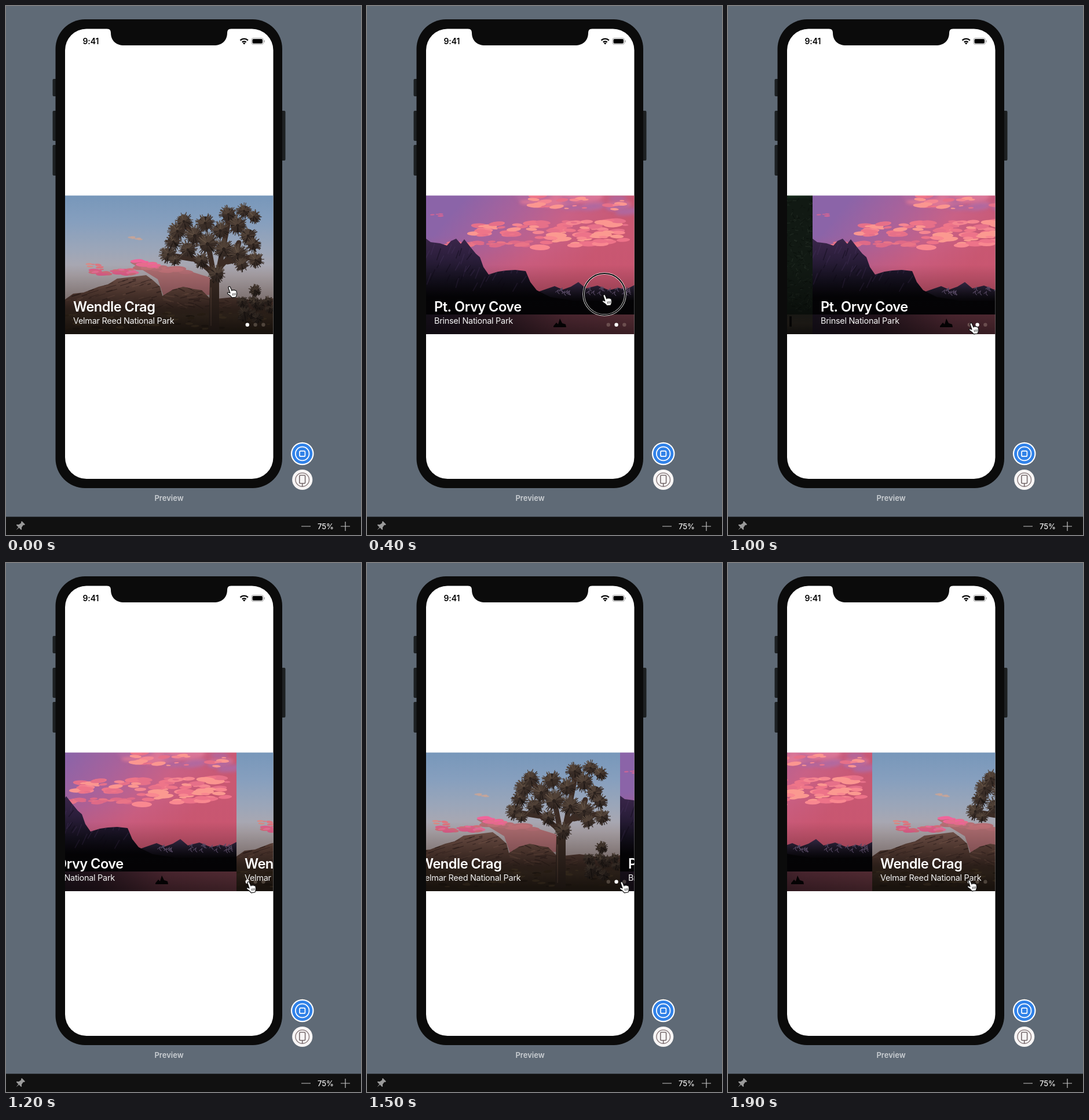
Write an HTML page with a canvas that moves like this. It is 613x914 px and loops after 2 s.

```html
<!DOCTYPE html>
<html lang="en">
<head>
<meta charset="utf-8">
<title>Carousel preview</title>
<style>
html, body { margin: 0; width: 100%; height: 100%; overflow: hidden; background: #5f6a76; }
canvas { display: block; width: 613px; height: 914px; }
</style>
</head>
<body>
<canvas id="stage" width="613" height="914"></canvas>
<script>
const stage = document.getElementById('stage').getContext('2d');
const LOOP = 2000, STEP = 100;
const VIEW = { x: 102, y: 327.5, w: 360, h: 239.5 };
const FONT = 'Inter, "Open Sans", sans-serif';

function seeded(seed) {
  return () => {
    seed = (seed * 1664525 + 1013904223) >>> 0;
    return seed / 4294967296;
  };
}

function gradient(c, x0, y0, x1, y1, colors) {
  const g = c.createLinearGradient(x0, y0, x1, y1);
  colors.forEach((col, i) => g.addColorStop(i / (colors.length - 1), col));
  return g;
}

function box(c, x, y, w, h, r, fill, stroke, line = 1) {
  c.beginPath();
  c.roundRect(x, y, w, h, r);
  paint(c, fill, stroke, line);
}

function disc(c, x, y, r, fill, stroke, line = 1) {
  c.beginPath();
  c.arc(x, y, r, 0, 7);
  paint(c, fill, stroke, line);
}

function paint(c, fill, stroke, line) {
  if (fill) { c.fillStyle = fill; c.fill(); }
  if (stroke) { c.strokeStyle = stroke; c.lineWidth = line; c.stroke(); }
}

function shape(c, d, fill, stroke, line = 1) {
  const p = new Path2D(d);
  if (fill) { c.fillStyle = fill; c.fill(p); }
  if (stroke) { c.strokeStyle = stroke; c.lineWidth = line; c.stroke(p); }
}

function text(c, str, x, y, size, weight, color, spacing = 0, align = 'left') {
  c.font = `${weight} ${size}px ${FONT}`;
  c.letterSpacing = spacing + 'px';
  c.textAlign = align;
  c.fillStyle = color;
  c.fillText(str, x, y);
}

// Scattered flat ellipses inside a slanted strip.
function wisps(c, rnd, n, x, y, w, h, slope, size, colors) {
  for (let i = 0; i < n; i++) {
    const u = rnd(), r = size * (0.4 + rnd());
    c.beginPath();
    c.ellipse(x + u * w, y + slope * u + rnd() * h, r, r * 0.28, -0.12 + rnd() * 0.2, 0, 7);
    c.fillStyle = colors[Math.floor(rnd() * colors.length)];
    c.fill();
  }
}

// Ball of spiky leaves, lit from the upper left.
function tuft(c, rnd, x, y, r) {
  disc(c, x, y, r * 0.72, '#2a211d');
  const tones = ['#1f1815', '#3a2e28', '#514238', '#665546'];
  for (let i = 0; i < r * 6; i++) {
    const a = rnd() * Math.PI * 2, len = r * (0.6 + rnd() * 0.5);
    const lit = 1.4 - Math.cos(a + 0.8) * 0.5 - Math.sin(a) * 1.1;
    c.strokeStyle = tones[Math.max(0, Math.min(3, Math.floor(lit + rnd())))];
    c.lineWidth = 1.2;
    c.beginPath();
    c.moveTo(x + Math.cos(a) * r * 0.2, y + Math.sin(a) * r * 0.2);
    c.lineTo(x + Math.cos(a) * len, y + Math.sin(a) * len);
    c.stroke();
  }
}

function desert(c) {
  const rnd = seeded(7);
  c.fillStyle = gradient(c, 0, 0, 0, 185, ['#7797ba', '#869fbe', '#9ba6b9', '#b0a8ad', '#b3a19f']);
  c.fillRect(0, 0, 360, 240);
  c.globalAlpha = 0.8;
  wisps(c, rnd, 6, 110, 70, 20, 3, 5, 5, ['#c9a597']);
  c.globalAlpha = 1;
  shape(c, 'M112 116 L130 112 L165 122 L205 128 L250 142 L258 172 L170 174 L160 145 Z', '#b06e72');
  wisps(c, rnd, 14, 125, 115, 95, 9, 16, 16, ['#c3747a', '#b87076']);
  wisps(c, rnd, 26, 50, 128, 72, 9, 0, 9, ['#e3618c', '#ee719b', '#d9707f']);
  wisps(c, rnd, 14, 118, 109, 42, 9, 8, 9, ['#f0659b', '#e66d8c']);
  wisps(c, rnd, 7, 36, 117, 28, 6, 2, 6, ['#d98b86', '#e0757f']);

  const rock = gradient(c, 0, 138, 0, 200, ['#77564d', '#604339', '#46312a']);
  const mound = 'M0 180 L14 170 L32 168 L58 158 L74 154 L90 144 L116 141 L140 138 L152 147 L164 158 L168 174 L186 163 L204 158 L222 162 L236 164 L252 180 L290 176 L330 182 L360 178 V240 H0 Z';
  shape(c, mound, rock);
  c.save();
  c.clip(new Path2D(mound));
  for (let i = 0; i < 150; i++) {
    const x = rnd() * 280, y = 140 + rnd() * 56, l = 5 + rnd() * 17;
    c.strokeStyle = rnd() < 0.62 ? 'rgba(45,29,26,.55)' : 'rgba(143,103,88,.35)';
    c.lineWidth = 0.7 + rnd() * 1.4;
    c.beginPath();
    c.moveTo(x, y);
    c.lineTo(x + l, y + (x < 160 ? -l * 0.3 : l * (rnd() - 0.4)));
    c.stroke();
  }
  c.restore();
  c.fillStyle = gradient(c, 0, 186, 0, 232, ['rgba(61,43,32,0)', '#49372a', '#3b2c20']);
  c.fillRect(0, 186, 360, 54);
  wisps(c, rnd, 70, 0, 200, 360, 34, 0, 6, ['#32251b', '#58442f', '#413020']);

  for (let i = 0; i < 12; i++) tuft(c, rnd, 306 + rnd() * 50, 182 + rnd() * 34, 8 + rnd() * 5);
  tuft(c, rnd, 328, 165, 11);
  tuft(c, rnd, 306, 184, 10);

  c.lineCap = 'round';
  shape(c, 'M258 232 V150 C257 125 230 118 218 106 M258 148 C258 120 290 112 300 82 M257 138 L246 80 L205 52 M266 125 L282 45 M280 115 L326 106 M220 110 L183 104', null, '#3b2b24', 9);
  shape(c, 'M248 234 L250 145 L266 143 L266 234 Z', '#3d2d25');
  shape(c, 'M252 160 V225', null, '#594237', 2);
  const leaves = [
    [178, 102, 15], [187, 80, 14], [190, 112, 10], [194, 62, 16], [205, 45, 15], [212, 94, 16],
    [224, 70, 18], [242, 48, 16], [246, 84, 19], [236, 113, 14], [262, 136, 15], [268, 61, 16],
    [282, 33, 15], [274, 93, 18], [298, 52, 17], [309, 27, 13], [326, 37, 12], [316, 70, 16],
    [298, 102, 18], [325, 85, 13], [329, 112, 14], [305, 120, 12]
  ];
  leaves.forEach(([x, y, r]) => tuft(c, rnd, x, y, r));
}

function lake(c) {
  const rnd = seeded(23);
  c.fillStyle = gradient(c, 70, 0, 250, 150, ['#8b64a8', '#a8629b', '#c96186', '#c95872']);
  c.fillRect(0, 0, 360, 240);
  c.fillStyle = gradient(c, 0, 70, 0, 170, ['rgba(195,82,112,0)', 'rgba(205,85,109,.75)']);
  c.fillRect(0, 70, 360, 110);
  c.filter = 'blur(3px)';
  wisps(c, rnd, 24, 170, -3, 190, 24, 8, 22, ['#dd7796', '#d87598', '#b0689f']);
  c.filter = 'none';
  const pinks = ['#ee7589', '#f58691', '#e67089', '#fb9690'];
  wisps(c, rnd, 60, 80, 49, 265, 22, -6, 12, pinks);
  wisps(c, rnd, 34, 190, 72, 165, 22, -14, 13, ['#fb9990', '#f98890', '#ed7389']);
  wisps(c, rnd, 24, 38, 80, 140, 7, 0, 9, ['#df6a87', '#e97487']);
  wisps(c, rnd, 24, 185, 0, 175, 22, 5, 10, pinks);
  wisps(c, rnd, 4, 4, 33, 24, 6, -2, 5, ['#cf6596']);

  const far = 'M180 172 L196 166 L222 157 L236 163 L250 158 L263 150 L276 161 L296 156 L316 164 L332 160 L345 163 L360 155 V240 H180 Z';
  shape(c, far, gradient(c, 0, 152, 0, 180, ['#382b49', '#211a2b', '#0b090f']));
  for (let i = 0; i < 22; i++) {
    const x = 205 + rnd() * 145, y = 162 + rnd() * 10;
    shape(c, `M${x} ${y} l5 -4 l-1 4 l3 3`, null, '#705e80', 1.1);
  }
  const near = 'M0 75 L8 81 L24 83 L36 87 L43 79 L52 75 L60 84 L66 76 L77 90 L86 101 L93 107 L99 124 L108 137 L124 132 L138 130 L154 129 L172 131 L180 150 L191 164 L215 176 L260 183 L360 181 V240 H0 Z';
  shape(c, near, gradient(c, 0, 75, 0, 176, ['#3a264a', '#2b1e3b', '#171222', '#050407']));
  c.save();
  c.clip(new Path2D(near));
  for (let i = 0; i < 45; i++) {
    const x = rnd() * 180, y = 82 + rnd() * 75;
    shape(c, `M${x} ${y} l${-4 - rnd() * 5} ${9 + rnd() * 12}`, null, rnd() < 0.5 ? 'rgba(14,9,23,.45)' : 'rgba(78,57,99,.3)', 1.6);
  }
  c.restore();
  c.fillStyle = '#060508';
  c.fillRect(0, 182, 360, 28);
  c.fillStyle = gradient(c, 0, 0, 360, 0, ['#241a2b', '#3b222f', '#7d4050', '#8e4b58']);
  c.fillRect(0, 206, 360, 34);
  shape(c, 'M220 226 L225 220 L228 223 L231 213 L235 221 L241 223 L242 228 H220 Z', '#090507');
}

function pines(c, rnd, x0, x1, y, h, color) {
  for (let x = x0; x < x1; x += 5) {
    const top = y - h * (0.45 + rnd() * 0.55);
    shape(c, `M${x} ${top} L${x + 5} ${y} H${x - 5} Z`, color);
  }
}

function aurora(c) {
  const rnd = seeded(41);
  c.fillStyle = gradient(c, 0, 0, 0, 200, ['#18261e', '#20382a', '#17291f']);
  c.fillRect(0, 0, 360, 240);
  const glow = (d, color, blur, alpha) => {
    c.filter = `blur(${blur}px)`;
    c.globalAlpha = alpha;
    shape(c, d, color);
  };
  glow('M0 98 L20 92 L75 118 L150 118 L205 150 H0 Z', '#397247', 13, 0.8);
  glow('M60 0 L95 0 L145 130 L115 135 Z', '#397a48', 10, 0.65);
  glow('M5 25 L25 32 L120 130 L88 132 Z', '#47784c', 9, 0.5);
  glow('M178 148 L215 88 L275 30 L360 0 H140 C140 60 170 80 172 148 Z', '#2d8340', 9, 0.85);
  glow('M138 0 H168 C158 40 170 68 186 136 L172 137 C168 90 142 60 138 0 Z', '#4bb158', 4, 0.95);
  glow('M188 0 H264 C255 55 220 60 205 78 C192 98 186 120 184 136 C181 105 188 80 182 45 Z', '#49b957', 5, 0.9);
  glow('M190 0 H233 C244 38 218 66 190 82 C180 55 184 24 190 0 Z', '#72df78', 4, 0.95);
  glow('M199 20 C218 27 224 44 207 62 C192 72 184 49 199 20 Z', '#9cef9d', 4, 0.9);
  glow('M185 138 C205 105 250 95 270 65 L245 120 Z', '#48964f', 8, 0.65);
  c.filter = 'none';
  c.globalAlpha = 1;
  for (let i = 0; i < 45; i++) {
    c.fillStyle = 'rgba(205,225,205,.35)';
    c.fillRect(rnd() * 260, rnd() * 110, 0.9, 0.9);
  }
  pines(c, rnd, 0, 270, 206, 72, '#0b110d');
  c.fillStyle = '#0a0f0c';
  c.fillRect(0, 178, 360, 62);

  c.filter = 'blur(5px)';
  shape(c, 'M268 40 L300 0 H370 V220 H255 L264 150 L276 110 Z', '#111913');
  c.filter = 'none';
  for (let i = 0; i < 520; i++) {
    const y = rnd() * 200, x = 258 + rnd() * 102;
    if (x < 285 - y * 0.12) continue;
    c.strokeStyle = ['#080d09', '#0d140f', '#273129', '#1b251d'][Math.floor(rnd() * 4)];
    c.lineWidth = 0.8;
    c.beginPath();
    c.moveTo(x, y);
    c.lineTo(x + rnd() * 14 - 7, y + rnd() * 10 - 3);
    c.stroke();
  }
  c.fillStyle = gradient(c, 0, 204, 0, 240, ['#292923', '#373129', '#28231e']);
  c.fillRect(0, 206, 360, 34);
  shape(c, 'M0 219 L70 213 L165 210 L135 222 L0 228 Z', '#69432b');
  shape(c, 'M166 166 L186 157 L264 174 V213 H166 Z', '#432a1d');
  for (let y = 170; y < 212; y += 5) shape(c, `M167 ${y} L264 ${y + 3}`, null, '#1e130e', 1);
  shape(c, 'M156 174 L182 153 L283 172 L281 180 L190 163 L158 180 Z', '#1c1613');
  shape(c, 'M184 154 L282 172', null, '#5a4434', 1);
  shape(c, 'M186 142 H194 V157 H186 Z', '#171310');
  box(c, 174, 188, 7, 17, 0, '#c27b55');
  box(c, 228, 190, 11, 15, 0, '#a3653f');
  shape(c, 'M233 190 V205 M228 197 H239', null, '#3a2418', 1.2);
  shape(c, 'M264 202 L269 240 M295 206 V228 M322 209 V227', null, '#0b0a09', 4);
}

function makePage(scene, title, place) {
  const page = document.createElement('canvas');
  page.width = VIEW.w;
  page.height = 240;
  const c = page.getContext('2d');
  scene(c);
  c.fillStyle = gradient(c, 0, 240, 0, 120, ['rgba(0,0,0,.6)', 'rgba(0,0,0,0)']);
  c.fillRect(0, 0, 360, 240);
  text(c, title, 14, 201, 23.6, 600, '#fff', -0.5);
  text(c, place, 14, 222, 14.5, 400, '#f4f4f4', -0.3);
  return page;
}

const pages = [
  makePage(desert, 'Wendle Crag', 'Velmar Reed National Park'),
  makePage(lake, 'Pt. Orvy Cove', 'Brinsel National Park'),
  makePage(aurora, 'Tolwick Hollow', 'Tolwick Hollow National Preserve')
];

const moves = [
  { at: 20, dur: 280, from: 0, to: 1, swipe: true },
  { at: 400, dur: 200, from: 1, to: 2, swipe: true },
  { at: 781, dur: 280, from: 2, to: 1 },
  { at: 1125, dur: 280, from: 1, to: 0 },
  { at: 1455, dur: 280, from: 0, to: 1 },
  { at: 1743, dur: 280, from: 1, to: 0 }
];

// Time and fingertip position.
const pointer = [
  [0, 386, 485], [100, 314, 488], [200, 170, 490], [300, 300, 495], [400, 410, 499],
  [600, 154, 484], [800, 415, 545], [1000, 420, 548], [1200, 419, 551],
  [1400, 437, 551], [1500, 440, 551], [1700, 420, 549], [1900, 417, 548], [2000, 386, 485]
];

function pointerAt(t) {
  const i = pointer.findIndex(k => k[0] > t);
  const [t0, x0, y0] = pointer[i - 1], [t1, x1, y1] = pointer[i];
  const u = (t - t0) / (t1 - t0);
  return [x0 + (x1 - x0) * u, y0 + (y1 - y0) * u];
}

const ease = u => u * u * (3 - 2 * u);

function drawCarousel(c, t) {
  const move = moves.filter(m => m.at <= t).pop() || { at: 0, dur: 1, from: 0, to: 0 };
  const u = Math.min(1, (t - move.at) / move.dur);
  const shift = Math.round(VIEW.w * ease(u));
  c.save();
  c.beginPath();
  c.rect(VIEW.x, VIEW.y, VIEW.w - 0.5, VIEW.h);
  c.clip();
  if (u < 1) c.drawImage(pages[move.from], VIEW.x - shift, 327);
  c.drawImage(pages[move.to], VIEW.x + VIEW.w - shift, 327);
  c.restore();
  const active = move.swipe && u < 1 ? move.from : move.to;
  for (let i = 0; i < 3; i++) {
    disc(c, 416.8 + i * 13.8, 550.8, 3.2, i === active ? '#fff' : 'rgba(255,235,215,.22)');
  }
  return Boolean(move.swipe) && u < 0.95;
}

function drawPointer(c, x, y, pressed) {
  if (pressed) {
    disc(c, x, y - 1, 36, null, 'rgba(255,255,255,.9)', 3.6);
    disc(c, x, y - 1, 36, null, '#080808', 2);
  }
  c.save();
  c.translate(x, y);
  c.lineJoin = 'round';
  shape(c, 'M-2.2 1.5 Q-1.5 -1 1 0 L4 7 Q5 4.7 7 6.2 Q8.5 4.7 9.6 6.7 Q11.5 6 12 8 L12.6 12 Q12.6 15 10.8 18 L4.4 18.8 Q2 15.5 -3 12.5 Q-4.8 10.2 -2 9.8 L1 11 Z', '#fff', '#111', 1.2);
  shape(c, 'M5 11.5 L6 15.5 M7.5 11 L8.3 15 M10 10.6 L10.5 14.4', null, '#222', 0.9);
  c.restore();
}

function drawDevice(c) {
  c.fillStyle = '#5f6a76';
  c.fillRect(0, 0, 613, 914);
  [[126, 30], [181, 52], [240, 53]].forEach(([y, h]) => box(c, 80.5, y, 9, h, 2, '#1d2022'));
  box(c, 473, 181, 9.5, 86, 2, '#1d2022');
  box(c, 85.5, 23, 391.5, 810, 51, '#0b0b0b');
  box(c, 102, 39.5, 359.5, 777.5, 37, '#fff');
  shape(c, 'M174 39 Q181 39.5 181 46 C181 60 190 68 204 68 H359 C373 68 382 60 382 46 Q382 39.5 389 39 Z', '#0b0b0b');

  text(c, '9:41', 132.5, 66, 14, 600, '#000', -0.1);
  c.lineCap = 'butt';
  [[4.8, 2.2], [9.4, 2.3]].forEach(([r, w]) => {
    c.beginPath();
    c.arc(411.2, 66, r, -Math.PI * 0.75, -Math.PI * 0.25);
    paint(c, null, '#000', w);
  });
  shape(c, 'M411.2 66.6 L408.9 64.2 Q411.2 62.3 413.5 64.2 Z', '#000');
  box(c, 424, 55.5, 20.5, 10.8, 3, null, '#a3a3a3', 1);
  box(c, 425.5, 57, 17.5, 7.8, 1.8, '#000');
  box(c, 445.6, 59, 1.3, 4, 1, '#a3a3a3');
}

function drawControls(c) {
  text(c, 'Preview', 281.5, 855, 13, 600, '#ccd0d4', 0, 'center');
  disc(c, 511.7, 773.5, 19.8, '#fff');
  disc(c, 511.7, 773.5, 17.6, '#3182e8');
  disc(c, 511.7, 773.5, 11.8, null, '#fff', 1.8);
  box(c, 507, 768.8, 9.4, 9.4, 2, null, '#fff', 1.7);
  disc(c, 511.7, 818.5, 17.6, '#f7f5f5');
  disc(c, 511.7, 818.5, 11.8, null, '#8e8082', 1.5);
  box(c, 506.8, 810.8, 9.8, 14, 1.8, '#f7f5f5', '#776b6d', 1.6);
  shape(c, 'M511.7 825 V830.5', null, '#776b6d', 1.6);

  c.fillStyle = '#111';
  c.fillRect(0, 882.5, 613, 32);
  c.save();
  c.translate(24.5, 898.5);
  c.rotate(Math.PI / 4);
  shape(c, 'M-4 -8 H4 V-6 L2.6 -5 L3.4 0 L6 2.2 V3.6 H0.8 L0 10 L-0.8 3.6 H-6 V2.2 L-3.4 0 L-2.6 -5 L-4 -6 Z', '#9b9b9b');
  c.restore();
  shape(c, 'M510 899 H526 M578 899 H594 M586 891 V907', null, '#c6c6c6', 1.2);
  text(c, '75%', 552, 903.5, 13, 500, '#f0f0f0', -0.1, 'center');
}

const start = performance.now();

function draw() {
  const elapsed = (performance.now() - start) % LOOP;
  const t = Math.floor(elapsed / STEP) * STEP;
  drawDevice(stage);
  const pressed = drawCarousel(stage, t);
  drawControls(stage);
  drawPointer(stage, ...pointerAt(t), pressed);
  requestAnimationFrame(draw);
}
draw();
</script>
</body>
</html>
```
